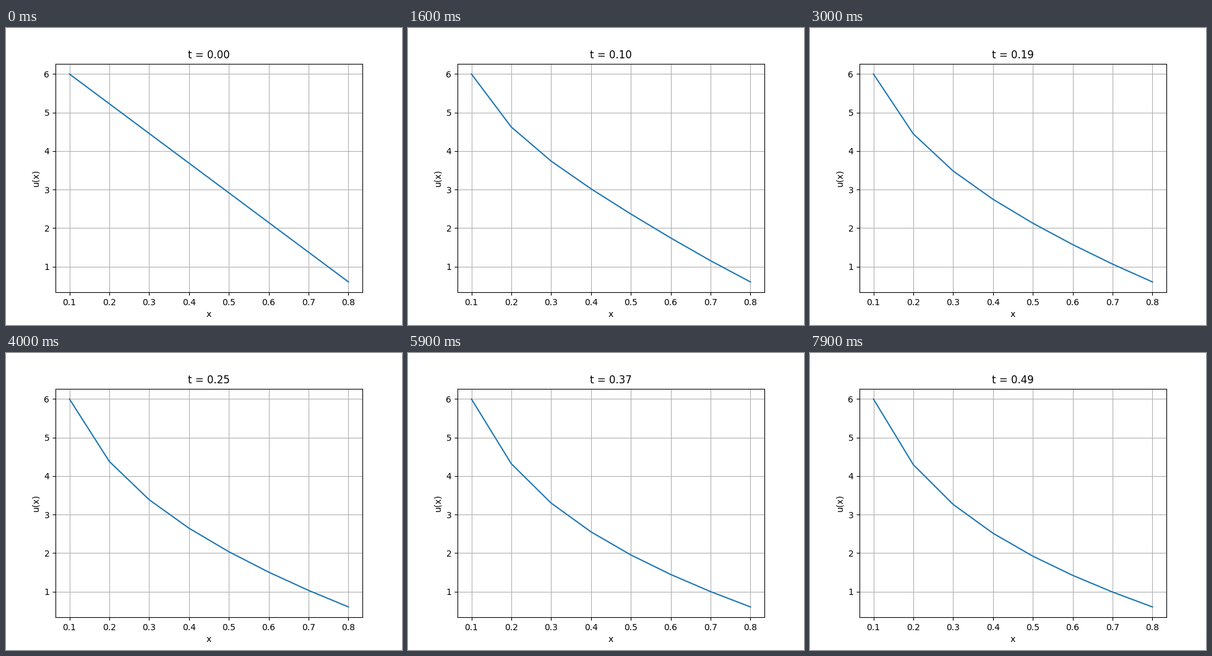
Animation, 640 px wide and 480 px high, one loop 8 s. Source, as a matplotlib script:

```python
import matplotlib.pyplot as plt
import numpy as np
from matplotlib.animation import FuncAnimation

FRAMES = 80
INTERVAL = 100  # ms
DT = 0.5 / FRAMES
DIFFUSIVITY = 0.442
SOURCE = 0.445

x = np.linspace(0.1, 0.8, 8)
h = x[1] - x[0]


def heat_step(u):
    """Advance radial heat conduction with fixed ends by one explicit step."""
    curvature = (u[2:] - 2 * u[1:-1] + u[:-2]) / h**2
    slope = (u[2:] - u[:-2]) / (2 * h)
    new = u.copy()
    new[1:-1] += DT * (DIFFUSIVITY * (curvature + slope / x[1:-1]) + SOURCE)
    return new


profiles = [np.linspace(6.0, 0.6, len(x))]
for _ in range(FRAMES - 1):
    profiles.append(heat_step(profiles[-1]))

fig, ax = plt.subplots(figsize=(6.4, 4.8), dpi=100)
line, = ax.plot(x, profiles[0])
ax.set_xlabel("x")
ax.set_ylabel("u(x)")
ax.grid(True)
title = ax.set_title("t = 0.00")


def update(frame):
    line.set_ydata(profiles[frame])
    title.set_text(f"t = {frame * DT:.2f}")
    return line, title


anim = FuncAnimation(fig, update, frames=FRAMES, interval=INTERVAL,
                     repeat=True, repeat_delay=0, blit=False)
plt.show()
```
